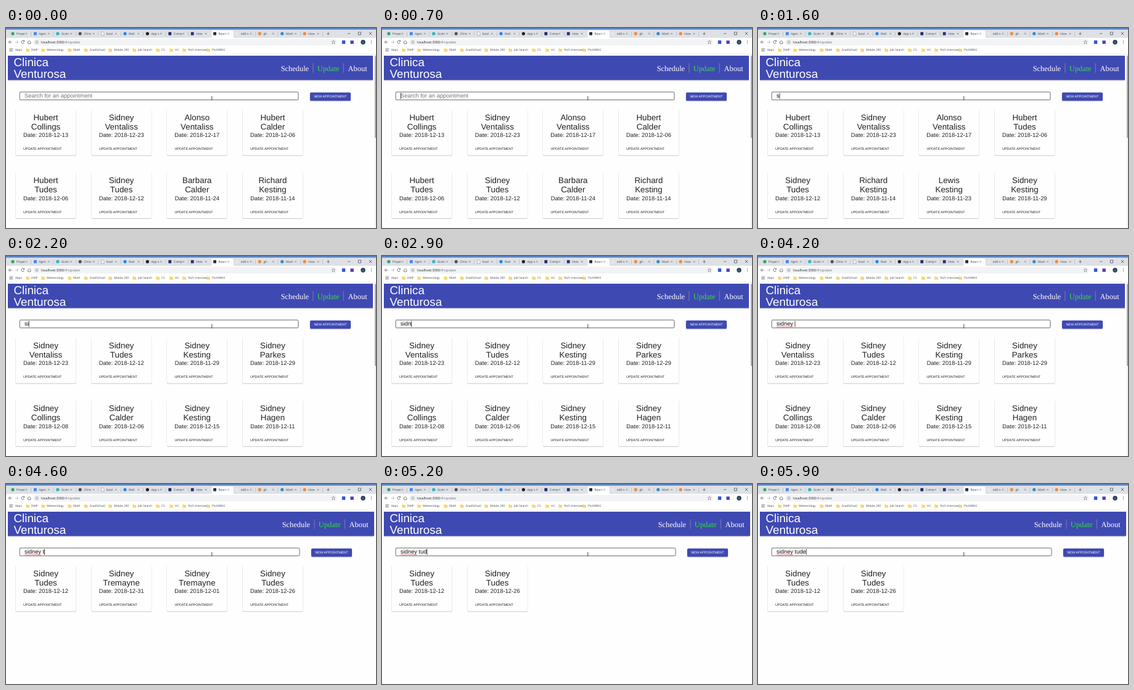
These frames come from a looping animation (600 by 325 pixels, 6000 ms). An HTML page:

```html
<!DOCTYPE html>
<html lang="en">
<head>
<meta charset="utf-8">
<title>Appointment search</title>
<style>
  html, body { margin: 0; width: 100%; height: 100%; overflow: hidden; background: #fefefe; }
  svg { display: block; width: 100%; height: 100%; }
  text { white-space: pre; text-rendering: geometricPrecision; font-family: "Liberation Sans", Arial, sans-serif; }
  .ui { font-family: "Open Sans", "Noto Sans", sans-serif; }
  .nav { font-family: "Liberation Serif", Times, serif; font-size: 12.4px; fill: #fff; }
  .name { font-size: 13.35px; }
  .date { font-size: 9.38px; }
  .btn { font-size: 5.45px; }
  .mid { text-anchor: middle; }
</style>
</head>
<body>
<svg id="stage" viewBox="0 0 600 325" xmlns="http://www.w3.org/2000/svg"></svg>
<script>
const LOOP = 6000;
const stage = document.getElementById('stage');

function add(tag, attrs, parent = stage, text) {
  const el = document.createElementNS('http://www.w3.org/2000/svg', tag);
  for (const k in attrs) el.setAttribute(k, attrs[k]);
  if (text !== undefined) el.textContent = text;
  parent.appendChild(el);
  return el;
}
const rect = (x, y, width, height, fill, more, parent) =>
  add('rect', { x, y, width, height, fill, ...more }, parent);
const dot = (cx, cy, r, fill) => add('circle', { cx, cy, r, fill });
const line = (d, stroke, w = 0.8, parent) =>
  add('path', { d, stroke, 'stroke-width': w, fill: 'none' }, parent);
const label = (x, y, text, cls, more, parent) =>
  add('text', { x, y, class: cls, ...more }, parent, text);

function drawTabs() {
  rect(0, 0, 600, 16, '#dee1e6');
  rect(0, 0, 600, 2.6, '#5b84c4');
  const tabs = [
    ['Prope', '#2fa866'], ['Agen', '#4285f4'], ['Grain', '#2bb5c4'], ['Clinic', '#555'],
    ['local', ''], ['Mail', '#1e88f5'], ['App s', '#222'], ['Comp', '#1d2a6b'],
    ['How', '#2b2a7c'], ['React', '#20323c'], ['edit s', '#e8e8e8'], ['git -', '#f08a3c'],
    ['Mark', '#2a8fd0'], ['How', '#f08a3c']
  ];
  tabs.forEach(([name, color], i) => {
    const x = 11 + i * 36.4;
    const active = i === 9;
    if (active) {
      add('path', { d: `M${x - 7} 16q2 0 2-2v-8q0-2 2-2h31q2 0 2 2v8q0 2 2 2z`, fill: '#fff' });
    } else if (i !== 8) {
      rect(x + 29.3, 6, 0.5, 7, '#a5a9ae');
    }
    if (!color) {
      add('path', { d: `M${x - 2} 6.2h2.6l1.6 1.6v4.4h-4.2z`, fill: '#fff', stroke: '#777', 'stroke-width': 0.5 });
    } else if (i === 1 || (i > 6 && i < 10)) {
      rect(x - 2.4, 6.7, 4.8, 5, color);
    } else {
      dot(x, 9.2, 2.6, color);
    }
    label(x + 6, 11, name, 'ui', { 'font-size': 4.9, fill: '#3c4043' });
    line(`M${x + 20.6} 7.9l2.6 2.6m0-2.6l-2.6 2.6`, '#555', 0.55);
  });
  line('M520 9.2h5M522.5 6.7v5', '#555', 0.7);
  line('M554 9h4.4', '#222', 0.6);
  line('M571.3 6.8h4.2v4.2h-4.2z', '#222', 0.6);
  line('M588.8 6.8l4.4 4.4m0-4.4l-4.4 4.4', '#222', 0.6);
}

function drawToolbar() {
  rect(0, 16, 600, 27, '#fff');
  rect(43, 17.6, 494, 10.8, '#f1f3f4', { rx: 5.4 });
  line('M9.5 23H4.5m2.4-2.4L4.5 23l2.4 2.4', '#555');
  line('M14.8 23h5m-2.4-2.4l2.4 2.4-2.4 2.4', '#aaa');
  line('M29.3 21.4a2.4 2.4 0 1 0 .3 2.2M29.6 20v1.9h-1.9', '#555');
  line('M34.8 23l3-2.6 3 2.6M35.7 22.6v3h4.2v-3', '#555', 0.7);
  add('circle', { cx: 50, cy: 23, r: 2.2, fill: 'none', stroke: '#666', 'stroke-width': 0.55 });
  line('M50 22.6v1.6M50 21.6v.5', '#666', 0.5);
  const url = label(57, 25, '', 'ui', { 'font-size': 5.5 });
  add('tspan', { fill: '#222' }, url, 'localhost:3000');
  add('tspan', { fill: '#70757a' }, url, '/#/update');
  line('M531 20l.9 1.9 2 .3-1.5 1.4.4 2-1.8-1-1.8 1 .4-2-1.5-1.4 2-.3z', '#666', 0.55);
  rect(544.8, 20.2, 5.4, 5.6, '#2f55e0');
  rect(558.4, 20.4, 5.4, 5.4, '#4c3fc4');
  rect(569.3, 19.5, 0.5, 7, '#ccc');
  dot(579, 23, 3.7, '#1f4258');
  label(579, 24.6, 't', 'ui mid', { 'font-size': 4.6, fill: '#fff' });
  [20.9, 23, 25.1].forEach(y => dot(592.5, y, 0.6, '#555'));

  for (let i = 0; i < 9; i++) {
    rect(5.8 + (i % 3) * 1.9, 33 + Math.floor(i / 3) * 1.9, 1.3, 1.3, ['#e0564a', '#4a9a5a', '#4a80e0'][i % 3]);
  }
  const marks = [
    [41, 'DMP'], [66, 'Meteorology'], [109, 'Math'], [135.5, 'GradSchool'], [175, 'Mobile 290'],
    [214, 'Job Search'], [252, 'CS'], [274, 'HC'], [295, 'Tech Interview'], [334, 'PluViMNS']
  ];
  const small = { 'font-size': 4.7, fill: '#444' };
  label(15, 37.4, 'Apps', 'ui', small);
  marks.forEach(([x, name]) => {
    add('path', { d: `M${x - 8.6} 33.2h2.2l.8.8h2.6v4.4h-5.6z`, fill: '#f8d56c' });
    label(x, 37.4, name, 'ui', small);
  });
  rect(0, 42.6, 600, 0.5, '#ddd');
}

drawTabs();
drawToolbar();

// Page header and search row; the parts on the right follow the scrollbar
const BLUE = '#3f49b2';
rect(3, 84, 592, 1, '#a9acc4');
const headShade = rect(3, 85, 592, 1.2, '#dfe0e8');
const head = rect(3, 45, 592, 39.4, BLUE);
label(12.5, 62.3, 'Clinica', '', { 'font-size': 18.8, fill: '#fff' });
label(12.5, 81.2, 'Venturosa', '', { 'font-size': 18.8, fill: '#fff' });

const right = add('g', {});
label(445.7, 69.6, 'Schedule', 'nav', {}, right);
label(504.8, 69.6, 'Update', 'nav', { style: 'fill:#35dd4c' }, right);
label(554.6, 69.6, 'About', 'nav', {}, right);
[497.6, 546.8].forEach(x => rect(x, 57.3, 0.8, 15.5, '#8a8aa8', {}, right));
rect(492.6, 106, 66.8, 13.6, '#d5d6de', { rx: 2 }, right);
rect(493, 105.8, 66, 13, '#a4a6bd', { rx: 2 }, right);
rect(493, 104.8, 66, 13.2, BLUE, { rx: 1.8 }, right);
label(526, 113.4, 'NEW APPOINTMENT', 'btn mid', { fill: '#fff' }, right);

const box = rect(22.2, 104, 451.8, 12.8, '#fff', { rx: 1.6, stroke: '#555', 'stroke-width': 0.9 });
const field = label(30, 113.3, '', '', { 'font-size': 9.35 });
const squiggle = line('', '#e0393e', 0.7);
const caret = rect(30, 105.6, 0.8, 9.6, '#111');
line('M332.6 111.4q1.2 0 1.2.8v4q0 .8-1.2.8M335 111.4q-1.2 0-1.2.8v4q0 .8 1.2.8', '#444', 0.6);

const bar = add('g', {});
rect(597.8, 43, 2.2, 282, '#f1f1f1', {}, bar);
rect(598, 45.5, 2, 133, '#a8a8a8', {}, bar);

const people = `Hubert Collings 12-13
Sidney Ventaliss 12-23
Alonso Ventaliss 12-17
Hubert Calder 12-06
Hubert Tudes 12-06
Sidney Tudes 12-12
Barbara Calder 11-24
Richard Kesting 11-14
Lewis Kesting 11-23
Sidney Kesting 11-29
Sidney Parkes 12-29
Sidney Collings 12-08
Sidney Calder 12-06
Sidney Kesting 12-15
Sidney Hagen 12-11
Sidney Tremayne 12-31
Sidney Tremayne 12-01
Sidney Tudes 12-26`.split('\n').map(row => row.split(' '));

function makeCard(i) {
  const g = add('g', { transform: `translate(${15.7 + (i % 4) * 122.65} ${131.7 + Math.floor(i / 4) * 102.2})`, fill: '#222' });
  rect(-0.6, 0.2, 98.8, 76.4, '#f0f0f0', { rx: 2 }, g);
  rect(-0.2, 1, 98, 75, '#cfcfd2', { rx: 1.8 }, g);
  rect(0, 0, 97.6, 75, '#fefefe', { rx: 1.6 }, g);
  const first = label(48.8, 18.2, '', 'name mid', {}, g);
  const last = label(48.8, 33.2, '', 'name mid', {}, g);
  const date = label(48.8, 45.7, '', 'date mid', {}, g);
  label(12.4, 66.8, 'UPDATE APPOINTMENT', 'btn', {}, g);
  return { g, first, last, date };
}
const cards = Array.from({ length: 8 }, (_, i) => makeCard(i));

const phrase = 'sidney tude';
const keys = [1500, 1900, 2300, 2700, 3100, 3500, 4000, 4400, 4800, 5200, 5500];
const FOCUS = 500;
let shown = null;

function showQuery(query) {
  if (query === shown) return;
  shown = query;
  const found = people.filter(([a, b]) => `${a} ${b}`.toLowerCase().includes(query));
  cards.forEach((card, i) => {
    const p = found[i];
    card.g.style.display = p ? '' : 'none';
    if (!p) return;
    card.first.textContent = p[0];
    card.last.textContent = p[1];
    card.date.textContent = `Date: 2018-${p[2]}`;
  });

  const long = found.length > 4;
  const shift = long ? 0 : 2;
  bar.style.display = long ? '' : 'none';
  right.setAttribute('transform', `translate(${shift} 0)`);
  head.setAttribute('width', 592 + shift);
  headShade.setAttribute('width', 592 + shift);
  box.setAttribute('width', 451.8 + shift);

  field.textContent = query || 'Search for an appointment';
  field.setAttribute('fill', query ? '#111' : '#757575');
  const wide = query ? field.getComputedTextLength() : 0;
  caret.setAttribute('x', 30 + wide);
  const word = query.indexOf(' ');
  squiggle.setAttribute('d', word < 0 ? '' : `M30 115h${field.getSubStringLength(0, word)}`);
}

function draw(t) {
  const typed = keys.filter(k => k <= t).length;
  showQuery(phrase.slice(0, typed));
  const since = t - (typed ? keys[typed - 1] : FOCUS);
  caret.style.display = since >= 0 && since % 1000 < 500 ? '' : 'none';
}

const start = performance.now();
function tick() {
  draw((performance.now() - start) % LOOP);
  requestAnimationFrame(tick);
}
tick();
</script>
</body>
</html>
```
